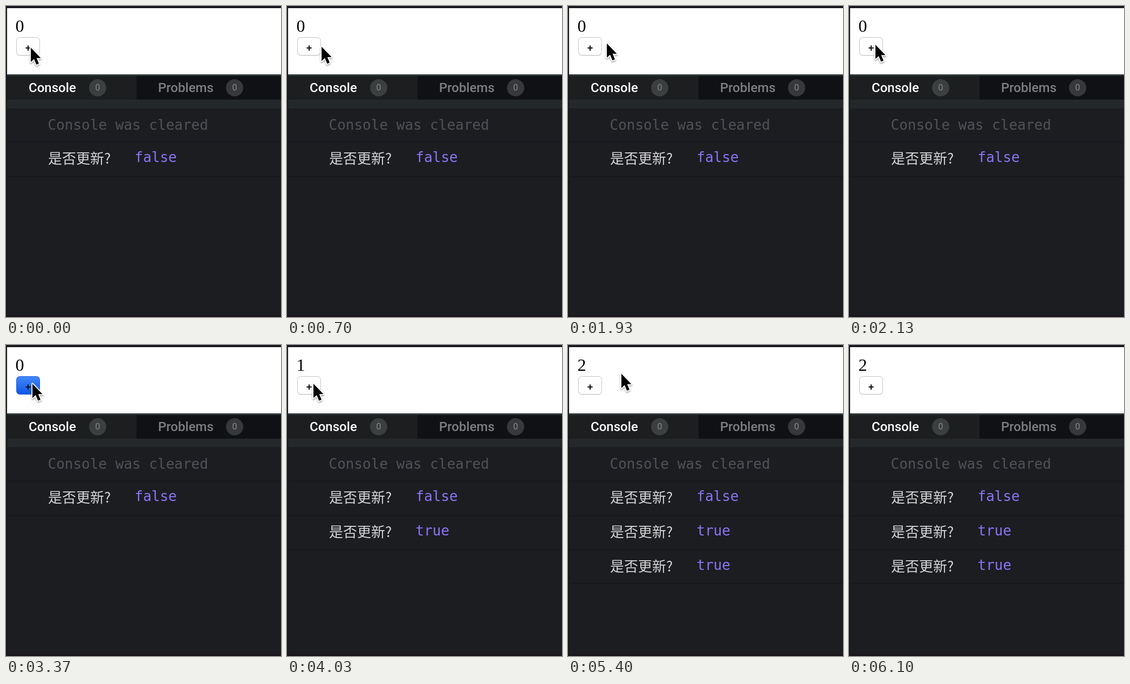
An HTML page that plays this animation: 510x578 px, repeating every 6630 ms.

```html
<!DOCTYPE html>
<html lang="zh">
<head>
<meta charset="utf-8">
<title>Console counter</title>
<style>
  html, body { margin: 0; width: 100%; height: 100%; overflow: hidden; background: #1c1d21; }
  svg { display: block; }
  text { white-space: pre; }
  .tab { font: 500 24px Roboto, sans-serif; }
  .badge { font: 400 16px Roboto, sans-serif; fill: #858a89; text-anchor: middle; }
  .mono { font: 26px "DejaVu Sans Mono", monospace; }
  .cjk { font: 26px "Noto Sans CJK SC", "Noto Sans CJK", sans-serif; fill: #d6d6d7; }
</style>
</head>
<body>
<svg id="stage" width="510" height="578" viewBox="0 0 510 578">
  <defs>
    <linearGradient id="blue" x1="0" y1="0" x2="0" y2="1">
      <stop offset="0" stop-color="#4389fb"/>
      <stop offset="1" stop-color="#0e55e6"/>
    </linearGradient>
    <filter id="shadow" x="-50%" y="-30%" width="200%" height="170%">
      <feDropShadow dx="0" dy="2" stdDeviation="1.5" flood-color="#000" flood-opacity=".4"/>
    </filter>
  </defs>
  <rect width="510" height="578" fill="#1c1d21"/>
  <rect width="510" height="4" fill="#1b1820"/>
  <rect x="2" y="4" width="508" height="124" fill="#fff"/>
  <rect x="2" y="127" width="508" height="3" fill="#30383a"/>
  <rect x="2" y="130" width="240" height="44" fill="#1c1e20"/>
  <rect x="242" y="130" width="268" height="44" fill="#101115"/>
  <rect x="2" y="174" width="508" height="16" fill="#24282a"/>
  <rect width="2" height="578" fill="#17161b"/>
  <rect y="575" width="510" height="3" fill="#18151a"/>

  <text id="count" x="17.5" y="48" font-family="Liberation Serif, serif" font-size="32">0</text>
  <rect x="19.5" y="59.5" width="43" height="33" rx="6" fill="#000" opacity=".16"/>
  <rect id="button" x="19.5" y="58.5" width="43" height="33" rx="6"/>
  <text x="41" y="84" text-anchor="middle" font-family="Roboto, sans-serif" font-size="19" font-weight="500" fill="#111">+</text>

  <text class="tab" x="42" y="160" fill="#fff">Console</text>
  <circle cx="170" cy="152" r="16" fill="#3b3f3f"/>
  <text class="badge" x="170" y="157">0</text>
  <text class="tab" x="282" y="160" fill="#7d7e81">Problems</text>
  <circle cx="424" cy="152" r="16" fill="#36383b"/>
  <text class="badge" x="424" y="157">0</text>

  <text class="mono" x="77.5" y="230" font-style="italic" fill="#505257">Console was cleared</text>
  <rect x="2" y="252" width="508" height="2" fill="#17181b"/>
  <g id="rows"></g>

  <path id="cursor" d="M0 0V26.5L6 21L10.4 31.5L15 29.5L10.7 19.3H18.6Z" fill="#000" stroke="#fff"
    stroke-width="3.4" stroke-linejoin="round" paint-order="stroke" filter="url(#shadow)"/>
</svg>
<script>
const LOOP = 6630;
const $ = id => document.getElementById(id);
const UPDATES = [3630, 4730];
const PRESSES = [[3370, 3470], [4400, 4500]];
const GONE = 5530;

const smooth = u => u * u * (3 - 2 * u);
const easeOut = u => 1 - Math.pow(1 - u, 1.28);
const linear = u => u;

// start, end, target x, target y, easing
const MOVES = [
  [0, 230, 46, 78, linear],
  [535, 1030, 116, 69, smooth],
  [1667, 1930, 72, 69.5, smooth],
  [1930, 2130, 49, 72, easeOut],
  [4500, 4570, 48, 72, linear],
  [4967, 5400, 99, 53.5, smooth],
  [5400, 5530, 138, 39, linear]
];

function cursorAt(t) {
  let x = 46, y = 77.5;
  for (const [start, end, tx, ty, ease] of MOVES) {
    if (t <= start) break;
    const k = ease(Math.min(1, (t - start) / (end - start)));
    x += (tx - x) * k;
    y += (ty - y) * k;
  }
  return [x, y];
}

$("rows").innerHTML = ["false", "true", "true"].map((value, i) => `
  <g transform="translate(0 ${i * 64})">
    <text class="cjk" x="78" y="292.5">是否更新?</text>
    <text class="mono" x="238.5" y="290" fill="#8b73f6">${value}</text>
    <rect x="2" y="${i === 2 ? 314 : 316}" width="508" height="2" fill="#17181b"/>
  </g>`).join("");

function draw(t) {
  const step = Math.floor((t + 4) * 0.03);
  const time = Math.round(step / 0.3) * 10;
  const count = UPDATES.filter(at => time >= at).length;
  const pressed = PRESSES.some(([a, b]) => time >= a && time < b);

  $("count").textContent = count;
  [...$("rows").children].forEach((row, i) =>
    row.setAttribute("visibility", i <= count ? "visible" : "hidden"));
  $("button").setAttribute("fill", pressed ? "url(#blue)" : "#fff");
  $("button").setAttribute("stroke", pressed ? "#1a5be0" : "#c3c3c3");

  const [x, y] = cursorAt(time);
  $("cursor").setAttribute("transform", `translate(${x.toFixed(2)} ${y.toFixed(2)})`);
  $("cursor").setAttribute("visibility", time < GONE ? "visible" : "hidden");
}

const began = performance.now();
function tick() {
  draw((performance.now() - began) % LOOP);
  requestAnimationFrame(tick);
}
tick();
</script>
</body>
</html>
```
